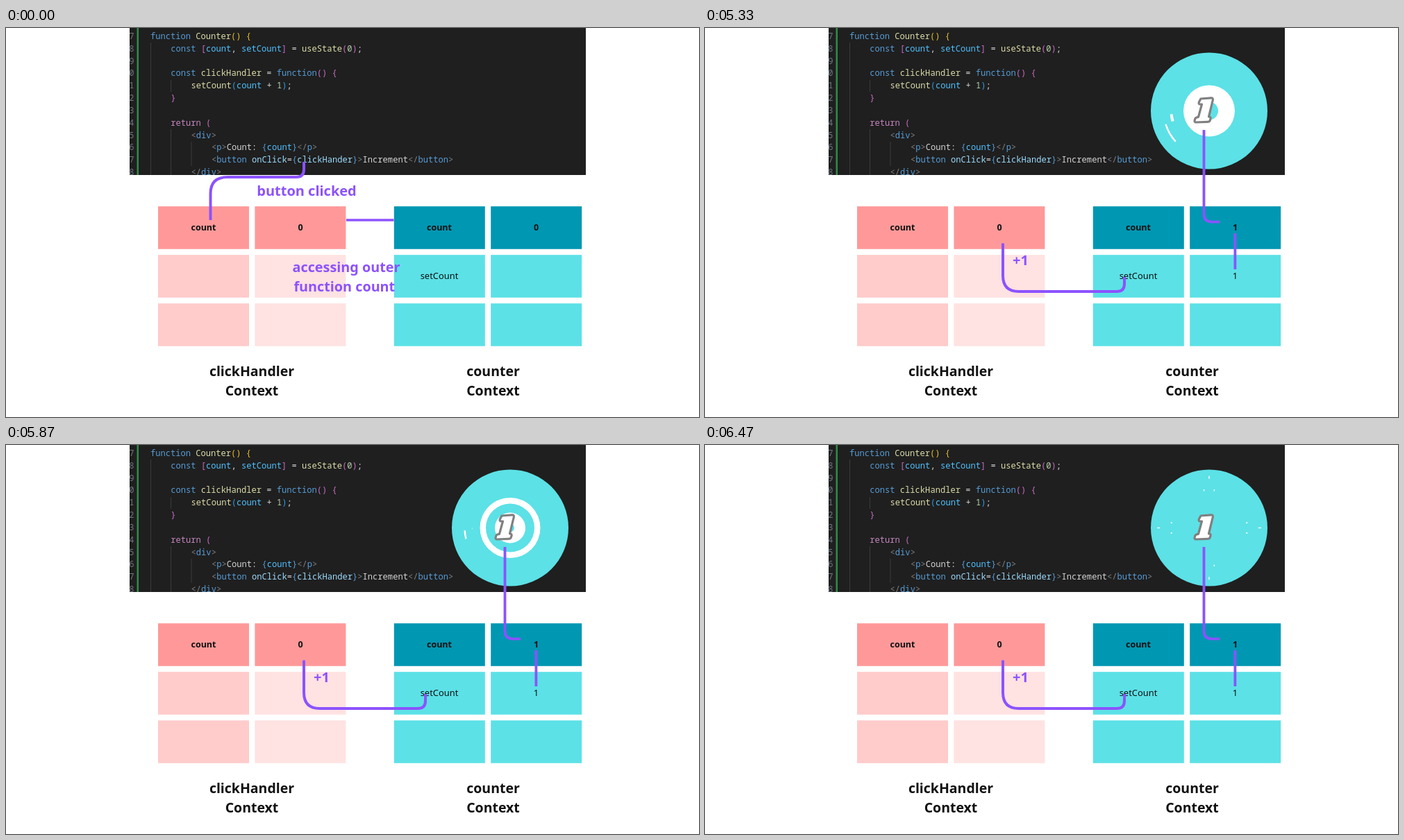
An HTML page with a canvas for the animation above (6.5 s loop, 998 by 561 pixels).

```html
<!DOCTYPE html>
<html lang="en">
<head>
<meta charset="utf-8">
<title>Counter context</title>
<style>
html, body { margin: 0; width: 100%; height: 100%; overflow: hidden; background: #fff; }
canvas { display: block; width: 998px; height: 561px; }
</style>
</head>
<body>
<canvas id="stage" width="998" height="561"></canvas>
<script>
const ctx = document.getElementById('stage').getContext('2d');
const LOOP = 6500, CLICK_END = 5000, FRAME = 1000 / 30;
const PURPLE = '#8c52ff', AQUA = '#5ce1e6', TEAL = '#0097b2', INK = '#111';
const CX = 726, CY = 119.5, TAU = Math.PI * 2;
const SANS = '"Noto Sans", "Open Sans", sans-serif';
const MONO = '"Noto Sans Mono", "DejaVu Sans Mono", monospace';

const SYNTAX = {
  k: '#569cd6', f: '#dcdcaa', v: '#4fc1ff', a: '#9cdcfe', r: '#c586c0',
  g: '#e8c22e', p: '#c96bc6', n: '#b5cea8', w: '#d4d4d4', t: '#808080', b: '#2f9be6'
};
// Each line: indent, then tokens written as colour key + text.
const CODE = [
  [0, 'kfunction ', 'fCounter', 'g() {'],
  [1, 'kconst ', 'p[', 'vcount', 'w, ', 'vsetCount', 'p]', 'w = ', 'fuseState', 'p(', 'n0', 'p)', 'w;'],
  [0],
  [1, 'kconst ', 'fclickHandler', 'w = ', 'kfunction', 'p() {'],
  [2, 'fsetCount', 'b(', 'vcount', 'w + ', 'n1', 'b)', 'w;'],
  [1, 'p}'],
  [0],
  [1, 'rreturn ', 'p('],
  [2, 't<', 'kdiv', 't>'],
  [3, 't<', 'kp', 't>', 'wCount: ', 'k{', 'vcount', 'k}', 't</', 'kp', 't>'],
  [3, 't<', 'kbutton ', 'aonClick', 'w=', 'k{', 'aclickHander', 'k}', 't>', 'wIncrement', 't</', 'kbutton', 't>'],
  [2, 't</', 'kdiv', 't>']
];

const clamp = v => Math.max(0, Math.min(1, v));
const progress = (s, from, to) => clamp((s - from) / (to - from));

function box(x, y, w, h, color) {
  ctx.fillStyle = color;
  ctx.fillRect(x, y, w, h);
}

function label(text, x, y, size, color = INK, weight = 700) {
  ctx.font = `${weight} ${size}px ${SANS}`;
  ctx.textAlign = 'center';
  ctx.fillStyle = color;
  ctx.fillText(text, x, y);
}

function stroke(path, color, width) {
  ctx.strokeStyle = color;
  ctx.lineWidth = width;
  ctx.stroke(new Path2D(path));
}

function disc(r, color) {
  if (r <= 0) return;
  ctx.fillStyle = color;
  ctx.beginPath();
  ctx.arc(CX, CY, r, 0, TAU);
  ctx.fill();
}

function drawEditor() {
  ctx.save();
  ctx.beginPath();
  ctx.rect(178, 0, 657, 212);
  ctx.clip();
  box(178, 0, 657, 212, '#1f1f1f');
  box(188.5, 0, 2.5, 212, '#2f8b48');
  box(208, 21, 1, 191, '#3c3c3c');
  box(237, 75, 1, 17, '#3c3c3c');
  box(237, 146, 1, 66, '#3c3c3c');
  box(266.5, 164, 1, 35, '#3c3c3c');
  ctx.font = `12.1px ${MONO}`;
  ctx.textAlign = 'left';
  const advance = ctx.measureText('0').width;
  CODE.forEach(([indent, ...tokens], i) => {
    const y = 16 + i * 17.82;
    ctx.fillStyle = '#6e7681';
    ctx.fillText((7 + i) % 10, 177.2, y);
    let x = 208 + indent * 29.3;
    for (const token of tokens) {
      ctx.fillStyle = SYNTAX[token[0]];
      ctx.fillText(token.slice(1), x, y);
      x += (token.length - 1) * advance;
    }
  });
  ctx.restore();
}

function drawTable(x, colors) {
  colors.forEach((row, r) => row.forEach((color, c) =>
    box(x + c * 139.4, 257.2 + r * 70, 131, 61.6, color)));
}

function drawTables(updated) {
  drawTable(219, [['#ff9999', '#ff9999'], ['#ffcbcb', '#ffe2e2'], ['#ffcbcb', '#ffe2e2']]);
  drawTable(558.8, [[TEAL, TEAL], [AQUA, AQUA], [AQUA, AQUA]]);
  label('count', 284.5, 292.3, 12.5);
  label('0', 424, 292.3, 12.5);
  label('count', 624, 292.3, 12.5);
  label(updated ? '1' : '0', 763.5, 292.3, 12.5);
  label('setCount', 624, 362, 12.9, INK, 400);
  if (updated) label('1', 763.5, 362, 12.9, INK, 400);
  label('clickHandler', 354, 502.3, 19.5);
  label('Context', 354, 529.7, 19.5);
  label('counter', 701.5, 502.3, 19.5);
  label('Context', 701.5, 529.7, 19.5);
}

function drawClick() {
  stroke('M429 193V204Q429 215 418 215H319Q294.5 215 294.5 239V277', PURPLE, 4);
  stroke('M490 277H558.5', PURPLE, 3.6);
  label('button clicked', 433, 242, 20, PURPLE);
  label('accessing outer', 490, 352, 19.8, PURPLE);
  label('function count', 487.3, 379.7, 19.8, PURPLE);
}

function drawUpdate() {
  stroke('M429 310.5V357Q429 380 452 380H593Q604 380 604 369V359', PURPLE, 4);
  stroke('M763.4 296V348', PURPLE, 3.8);
  stroke('M718.5 147V268Q718.5 279.6 730 279.6H741', PURPLE, 3.8);
  label('+1', 454.5, 341.7, 20, PURPLE);
}

// A square drawn from its top corner, which then turns and hollows out.
function drawSquare(s) {
  const drawn = s > 36 ? (s - 37.2) / 10.4 : (s + 1.3) / 10.4 + 0.0 * s;
  const part = s < 12.4 ? clamp(drawn + progress(s, 0, 7) * 0.3) : clamp(drawn);
  if (part <= 0 || (s > 12.4 && s < 37.2)) return;
  const r = 61.5 + progress(s, 7, 11.5) * 2.5;
  const turn = -Math.max(0, 57 + 17.4 * (s < 13 ? s - 10.5 : -10)) * Math.PI / 180;
  ctx.save();
  ctx.translate(CX, CY);
  ctx.rotate(turn);
  const corner = i => [-r * Math.sin(i * TAU / 4), -r * Math.cos(i * TAU / 4)];
  ctx.beginPath();
  ctx.moveTo(0, -r);
  for (let i = 0; i < 4; i++) {
    const k = clamp(part * 4 - i);
    if (!k) break;
    const [x0, y0] = corner(i), [x1, y1] = corner(i + 1);
    ctx.lineTo(x0 + (x1 - x0) * k, y0 + (y1 - y0) * k);
  }
  if (part === 1) ctx.closePath();
  const hollow = Math.max(0, s < 13 ? s - 10.5 : 0);
  ctx.lineJoin = 'miter';
  ctx.strokeStyle = '#fff';
  ctx.lineWidth = 2.8 + hollow * 2.2;
  ctx.stroke();
  if (hollow) {
    ctx.strokeStyle = AQUA;
    ctx.lineWidth = hollow * 3;
    ctx.stroke();
  }
  ctx.restore();
}

// One clockwise lap ending at the left; the tail catches up with the head.
function drawSweep(s, r, width, head, tail) {
  const angle = ([from, to, power]) => Math.PI - TAU * (1 - progress(s, from, to)) ** power;
  const a = angle(tail), b = angle(head);
  if (b - a < 0.005 || width <= 0) return;
  ctx.strokeStyle = '#fff';
  ctx.lineWidth = width;
  ctx.beginPath();
  ctx.arc(CX, CY, r, a, b);
  ctx.stroke();
}

function drawRings(s) {
  if (s < 17 || s > 28.4) return;
  const outer = Math.max(0, 37 + (s - 25) * 4.33);
  const hole = 13 + (s - 25) * 14.67;
  if (hole < outer) {
    disc(outer, '#fff');
    disc(hole, AQUA);
  }
  const inner = (s - 25) * 14.67;
  const innerHole = 6 + (s - 26.5) * 16;
  if (innerHole < inner) {
    disc(inner, '#fff');
    disc(innerHole, AQUA);
  }
}

function drawBurst(s) {
  if (s < 28 || s > 34) return;
  const dash = (r, angle, length) => {
    const c = Math.cos(angle), n = Math.sin(angle);
    ctx.beginPath();
    ctx.moveTo(CX + c * (r - length), CY + n * (r - length));
    ctx.lineTo(CX + c * r, CY + n * r);
    ctx.stroke();
  };
  const out = 1 - (1 - progress(s, 28, 33.5)) ** 2;
  const length = 18 * Math.sin(Math.PI * progress(s, 27.7, 33.6));
  ctx.strokeStyle = '#fff';
  ctx.lineWidth = 1.4;
  for (let i = 0; i < 4; i++) {
    const angle = i * TAU / 4;
    dash(48 + 27 * out, angle, length * 0.7);
    for (const side of [-1, 1]) dash(40 + 16 * out, angle + side * 0.135, length * 0.4);
  }
}

function drawBadge(s) {
  disc(84, AQUA);
  drawSquare(s);
  drawSweep(s, 65.5, 2.5, [14, 27.5, 1.8], [16.6, 28, 1.6]);
  drawSweep(s, 54.5, 4 * clamp((27.2 - s) / 2), [16, 27, 2.5], [17.5, 27, 2]);
  drawRings(s);
  drawBurst(s);
  const one = new Path2D('M714 102L729 100.8Q732 100.8 731.3 104L725.5 128Q729 128 728 131L727 134Q726 135.3 724 135.3L707 136Q704.5 136 705.2 133L706 130.5Q706.6 128.8 710.5 128.3L715.5 110H713Q710.5 110 711.3 107Z');
  ctx.lineJoin = 'round';
  ctx.fillStyle = '#fff';
  ctx.fill(one);
  ctx.strokeStyle = '#808080';
  ctx.lineWidth = 3.2;
  ctx.stroke(one);
}

function draw(now) {
  const t = now % LOOP;
  const updated = t >= CLICK_END;
  box(0, 0, 998, 561, '#fff');
  drawEditor();
  drawTables(updated);
  if (updated) {
    const step = Math.floor((t - CLICK_END + 4) / FRAME);
    drawBadge(step * 2.5 % 38.5);
    drawUpdate();
  } else {
    drawClick();
  }
}

const start = performance.now();
function tick() {
  draw(performance.now() - start);
  requestAnimationFrame(tick);
}
tick();
</script>
</body>
</html>
```
